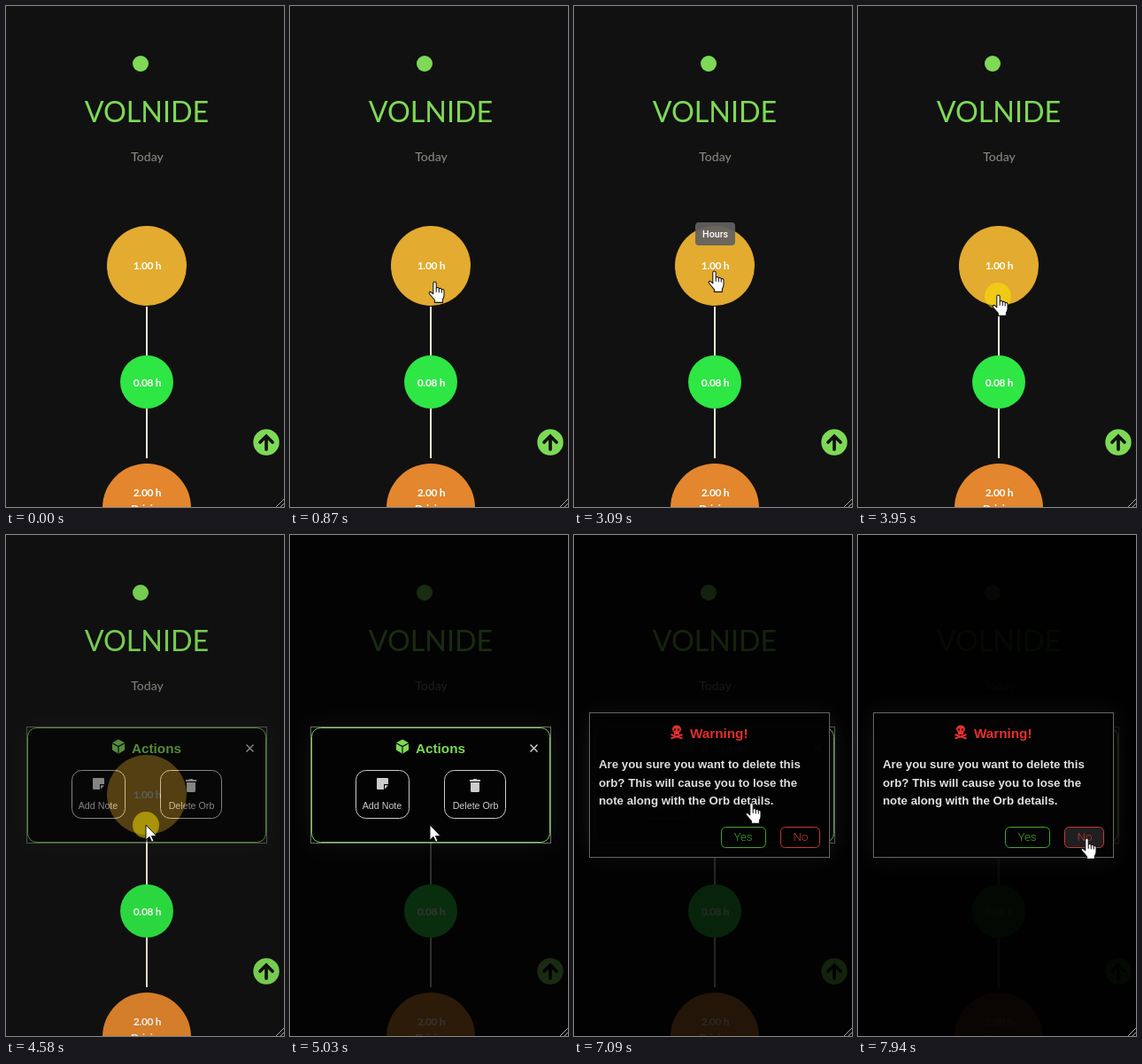
An HTML page for the animation above (7.99 s loop, 314x565 px).

```html
<!DOCTYPE html>
<html lang="en">
<head>
<meta charset="utf-8">
<title>Timeline</title>
<style>
  html, body { margin: 0; width: 100%; height: 100%; overflow: hidden; background: #111; }
  svg { display: block; width: 314px; height: 565px; }
  text { fill: currentColor; }
  .mid { text-anchor: middle; }
  .title { font: 400 32.3px Lato, sans-serif; }
  .day { font: 500 14px Lato, sans-serif; color: #83887d; }
  .hours { font: 700 12px Lato, sans-serif; letter-spacing: -.3px; color: #fff; }
  .tip { font: 500 10.7px Roboto, sans-serif; color: #fff; }
  .head { font: 700 15.25px "Liberation Sans", sans-serif; }
  .body { font: 700 13.28px "Liberation Sans", sans-serif; color: #e2e2e2; }
  .small { font: 10.7px "Liberation Sans", sans-serif; }
  .choice { font: 300 13.3px Roboto, sans-serif; }
  .frame { fill: none; stroke: currentColor; }
  .dots { fill: none; stroke: #ccc; stroke-dasharray: 1 1; }
  .glow { fill: #fff; opacity: .06; filter: blur(14px); }
  .pointer { fill: #fff; stroke: #111; stroke-linejoin: round; }
</style>
</head>
<body>
<svg viewBox="0 0 314 565">
  <rect width="314" height="565" fill="#111"/>

  <g id="page">
    <g color="#7ed957">
      <circle cx="152" cy="65" r="9" fill="currentColor"/>
      <text class="mid title" x="159" y="131">VOLNIDE</text>
      <circle cx="294" cy="492" r="14.7" fill="currentColor"/>
      <path d="M294 500V486M287 492l7-7 7 7" fill="none" stroke="#111" stroke-width="3.7" stroke-linecap="round"/>
    </g>
    <text class="mid day" x="159.5" y="175">Today</text>
    <path d="M159 339v56M159 454v56" stroke="#f0ead6" stroke-width="2"/>
    <circle cx="159" cy="293" r="45" fill="#e3ab2f"/>
    <circle cx="159" cy="424" r="30" fill="#2ee644"/>
    <circle cx="159" cy="566" r="50" fill="#e3862d"/>
    <g class="mid hours">
      <text x="159.5" y="297">1.00 h</text>
      <text x="159.5" y="429">0.08 h</text>
      <text x="159.5" y="553">2.00 h</text>
      <text x="159.5" y="571">Driving</text>
    </g>
  </g>

  <g id="actionsTip" class="mid tip">
    <rect x="133" y="244" width="53" height="26" rx="4" fill="#616161" opacity=".93"/>
    <text x="159.5" y="261">Actions</text>
  </g>
  <g id="hoursTip" class="mid tip">
    <rect x="137" y="244" width="45" height="26" rx="4" fill="#616161" opacity=".93"/>
    <text x="159.5" y="261">Hours</text>
  </g>

  <rect id="shade1" width="314" height="565"/>
  <g id="dialog1">
    <rect class="glow" x="24" y="217" width="270" height="130"/>
    <rect x="24" y="217" width="270" height="130" rx="10" fill="#030303"/>
    <rect class="dots" x="23.5" y="216.5" width="271" height="131"/>
    <g color="#7ed957">
      <rect class="frame" x="24.5" y="217.5" width="269" height="129" rx="10"/>
      <path d="M127 230.5l7 3.8v8.2l-7 4.2-7-4.2v-8.2z" fill="currentColor"/>
      <path d="M120 234.8l7 3.8 7-3.8M127 238.6v8" fill="none" stroke="#030303" stroke-width="1.1"/>
      <text class="head" x="142" y="246">Actions</text>
    </g>
    <path d="M271.5 236.5l8 8m0-8l-8 8" stroke="#ccc" stroke-width="1.5"/>
    <g id="addNote">
      <rect class="frame" x="74.5" y="265.5" width="60" height="54" rx="11"/>
      <path d="M99 274h11q1 0 1 1v6h-5v6h-7q-1 0-1-1v-11q0-1 1-1zM107 282.3h4l-4 4.2z" fill="currentColor"/>
      <text class="mid small" x="104" y="309">Add Note</text>
    </g>
    <g id="remove">
      <rect class="frame" x="174.5" y="265.5" width="69" height="54" rx="11"/>
      <path d="M203 276h3.5l1-1h3l1 1h3.5v2h-12zM204 279h10v9.5q0 1.5-1.5 1.5h-7q-1.5 0-1.5-1.5z" fill="currentColor"/>
      <text class="mid small" x="209.5" y="309">Delete Orb</text>
    </g>
  </g>

  <rect id="shade2" width="314" height="565"/>
  <g id="dialog2">
    <rect class="glow" x="17" y="200" width="272" height="164"/>
    <rect x="17" y="200" width="272" height="164" fill="#030303"/>
    <rect class="dots" x="17.5" y="200.5" width="271" height="163"/>
    <g color="#e5302e">
      <path d="M109.5 225l13 4.5m0-4.5l-13 4.5" stroke="currentColor" stroke-width="2"/>
      <path d="M111 219a5 4.5 0 0 1 10 0q0 2.5-2 3.5v2.5h-6v-2.5q-2-1-2-3.5z" fill="currentColor"/>
      <path d="M113 219.5h2m2 0h2" stroke="#030303" stroke-width="2"/>
      <text class="head" x="131" y="229">Warning!</text>
    </g>
    <g class="body">
      <text x="28" y="263">Are you sure you want to delete this</text>
      <text x="28" y="284">orb? This will cause you to lose the</text>
      <text x="28" y="304">note along with the Orb details.</text>
    </g>
    <g class="mid choice">
      <g color="#46a52c">
        <rect id="yes" class="frame" x="166.5" y="329.5" width="50" height="23" rx="5"/>
        <text x="191" y="345">Yes</text>
      </g>
      <g color="#c83838">
        <rect id="no" class="frame" x="233.5" y="329.5" width="44" height="23" rx="5"/>
        <text x="256" y="345">No</text>
      </g>
    </g>
  </g>

  <path d="M305 565l9-9M310 565l4-4" stroke="#aaa"/>
  <circle id="press" r="15" fill="#ffe800"/>
  <g id="cursor" class="pointer">
    <path id="arrow" d="M0 0V17l4-3.8 2.6 6 2.4-1-2.6-5.8H12z"/>
    <g id="hand" transform="translate(-6.5 -1.5) scale(1.06)">
      <path d="M5 13.5V2.2q0-1.7 1.6-1.7t1.6 1.7V7q2.4-1 2.9.8 2.2-1 2.8.8 2.6-.6 2.6 1.6v5q0 2-1.5 4v3.3H6.5v-2.5Q4.5 17.5.8 13.2q-.6-1.6 1-2 1.2 0 3.2 2.3z"/>
      <path d="M8.2 7v4.5M11.1 8v4M13.9 8.8v3.5"/>
    </g>
  </g>
</svg>
<script>
const LOOP = 7990, ENTER = 260, OPEN1 = 4490, OPEN2 = 6880;
const el = id => document.getElementById(id);
const clamp = v => Math.max(0, Math.min(1, v));
const ramp = (t, from, to) => clamp((t - from) / (to - from));
const within = (t, from, to) => t >= from && t < to;
const show = (id, alpha) => { el(id).style.opacity = Number(alpha); };

// Pointer tip: time, x, y
const path = [
  [260, 285, 542], [900, 162, 309], [1150, 162, 309], [1440, 163, 319],
  [1690, 163, 319], [2270, 159, 289], [2760, 159, 289], [2880, 158, 289],
  [3089, 158, 289], [3090, 158, 300], [3650, 158, 327], [5310, 158, 327],
  [5640, 110, 308], [6020, 110, 308], [6420, 200, 303], [7100, 200, 303],
  [7430, 194, 338], [7460, 194, 338], [7940, 258, 343]
];

function pointerAt(t) {
  const next = path.findIndex(p => p[0] > t);
  if (next < 0) return path[path.length - 1].slice(1);
  if (next === 0) return path[0].slice(1);
  const [a, b] = [path[next - 1], path[next]];
  const k = 1 - (1 - ramp(t, a[0], b[0])) ** 1.45;
  return [a[1] + (b[1] - a[1]) * k, a[2] + (b[2] - a[2]) * k];
}

function openDialog(n, t, start) {
  show("shade" + n, 0.8 * ramp(t, start, start + 540) ** 1.4);
  show("dialog" + n, 1 - (1 - ramp(t, start, start + 240)) ** 2);
}

function draw(t) {
  const [x, y] = pointerAt(t);
  const over = (left, top, w, h) => x >= left && x <= left + w && y >= top && y <= top + h;
  const first = within(t, OPEN1, OPEN2), second = t >= OPEN2;
  const onCircle = t < OPEN1 && Math.hypot(x - 159, y - 293) < 45;
  const onAdd = first && over(74, 265, 61, 55);
  const onRemove = t >= OPEN1 && over(174, 265, 70, 55);
  const onYes = second && over(166, 329, 51, 24);
  const onNo = second && over(233, 329, 45, 24);

  openDialog(1, t, OPEN1);
  openDialog(2, t, OPEN2);
  show("actionsTip", t < 2760 ? ramp(t, 1950, 2150) : 0);
  show("hoursTip", t < 2880 ? 0 : 1 - ramp(t, 3250, 3400));

  el("addNote").style.color = onAdd ? "#7ed957" : "#ccc";
  el("remove").style.color = onRemove ? "#e5302e" : "#ccc";
  el("yes").style.fill = onYes ? "#1f1f1f" : "none";
  el("no").style.fill = onNo ? "#1f1f1f" : "none";

  const place = `translate(${Math.round(x)} ${Math.round(y)})`;
  el("cursor").setAttribute("transform", place);
  el("press").setAttribute("transform", place);
  const pressed = within(t, 3950, OPEN1 + 110) || within(t, 6640, OPEN2 + 110);
  show("press", pressed ? 0.5 : 0);
  show("cursor", t >= ENTER);
  const hand = onCircle || onAdd || onRemove || onYes || onNo;
  show("hand", hand);
  show("arrow", !hand);
}

const began = performance.now();
function tick() {
  draw((performance.now() - began) % LOOP);
  requestAnimationFrame(tick);
}
tick();
</script>
</body>
</html>
```
